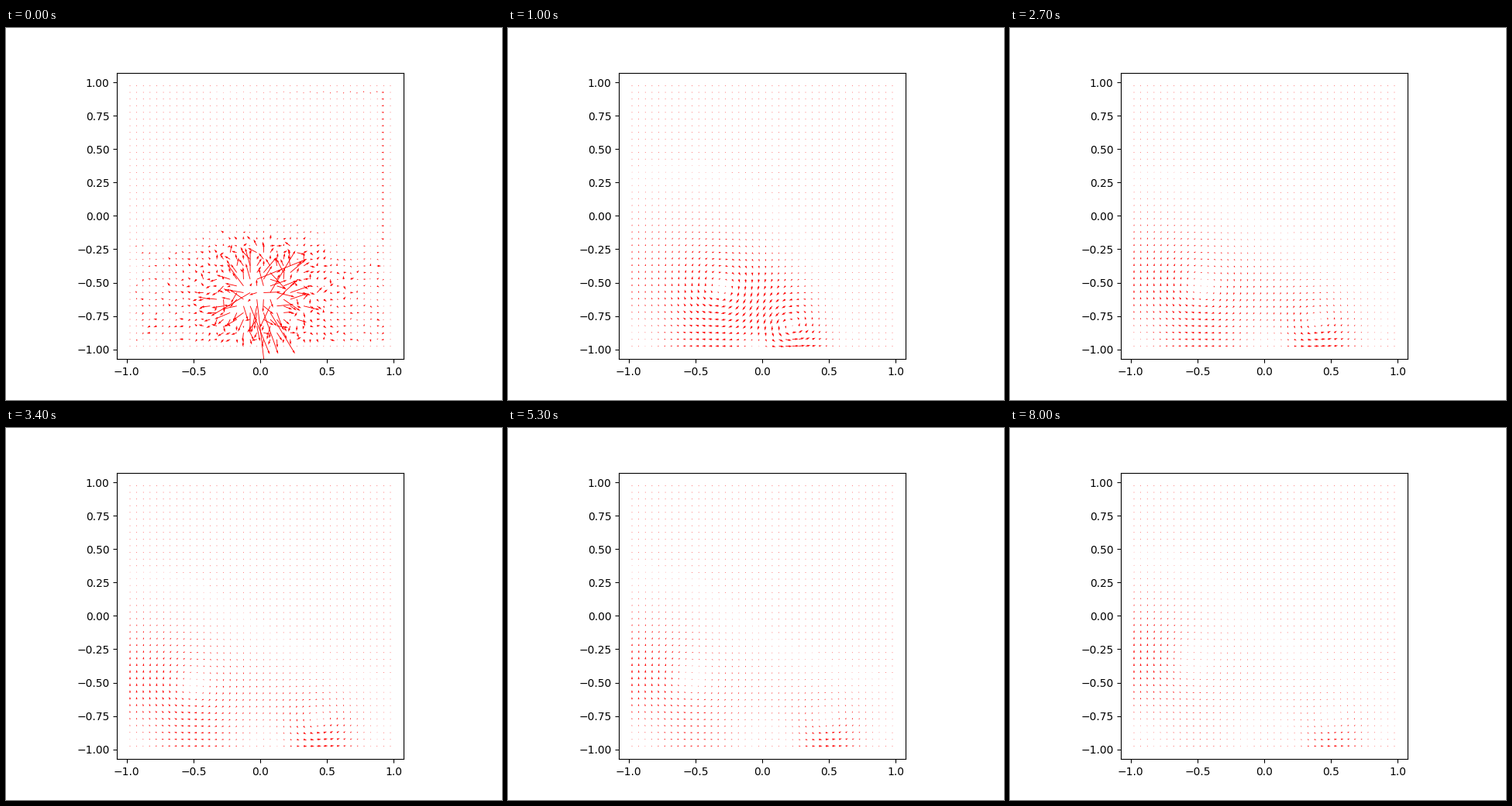
Animation, 640 px wide and 480 px high, one loop 8050 ms. Source, as a matplotlib script:

```python
import numpy as np
import matplotlib.pyplot as plt
from matplotlib.animation import FuncAnimation

N = 40
FRAMES = 161
STEP = 50  # ms

axis = (np.arange(N) + 0.5) * 2 / N - 1
X, Y = np.meshgrid(axis, axis)


def make_burst():
    """Initial burst: ragged outward kicks, plus ripples along the walls."""
    rng = np.random.default_rng(4)
    dx, dy = X, Y + .57
    r2 = dx ** 2 + dy ** 2
    fade = np.exp(-np.clip(Y + .3, 0, None) / .3)
    low = 1 / (1 + np.exp((Y + .2) / .1))
    spread = rng.lognormal(-.1, .3 + .5 * np.exp(-r2 / .06))
    length = np.minimum((1.1 / (r2 + .035) + low) * fade * spread, 115)
    angle = np.arctan2(dy, dx) + rng.normal(0, .75, (N, N))
    u, v = length * np.cos(angle), length * np.sin(angle)

    gap = 1 - np.maximum(np.abs(X), np.abs(Y))
    ripple = 3.5 * np.exp(-(gap - .07) / .06) * (.55 + .45 * X)
    ripple *= np.where(np.arange(N) % 2, 1, -1)
    side = np.abs(X) >= np.abs(Y)
    u += ripple * side
    v += ripple * ~side * .7
    inside = gap > .05
    return u * inside, v * inside


BURST = make_burst()
MODES = np.arange(N)
BASIS = np.cos(np.pi * np.outer(np.arange(N) + .5, MODES) / N)
BASIS *= np.where(MODES == 0, np.sqrt(1 / N), np.sqrt(2 / N))


def diffuse(field, t):
    heat = BASIS * np.exp(-(np.pi * MODES / N) ** 2 * 4 * t) @ BASIS.T
    return heat @ field @ heat.T * np.exp(-t / .2)


def mirrored(c):
    """A coordinate and its reflections in the two walls, with signs."""
    return (c, 1), (-2 - c, -1), (2 - c, -1)


def vortex(x, y, strength, core):
    """Clockwise vortex in the box; mirror images keep the walls closed."""
    u, v = np.zeros((2, N, N))
    for mx, sx in mirrored(x):
        for my, sy in mirrored(y):
            dx, dy = X - mx, Y - my
            spin = sx * sy * strength / (dx ** 2 + dy ** 2 + core ** 2)
            u += spin * dy
            v -= spin * dx
    return u, v


def velocity(n):
    t = n * STEP / 1000
    age = max(t, .3)
    drift = 1 - np.exp((1 - t) / 1.7)
    start = min(t / .4, 1)
    left = vortex(-.29 - .29 * drift, -.56 + .0045 * (t - 1) ** 2,
                  1.8 * age ** -.16, .18 * age ** .22)
    right = vortex(.2 + .3 * drift, -.83 + .03 * drift,
                   -1.5 * age ** -.3, .12 * age ** .17)
    return [start * (a + b) + diffuse(c, t)
            for a, b, c in zip(left, right, BURST)]


fig, ax = plt.subplots(figsize=(6.4, 4.8), dpi=100)
ax.set_aspect("equal")
ax.set_xlim(-1.0725, 1.0725)
ax.set_ylim(-1.0725, 1.0725)
ax.set_xticks(np.linspace(-1, 1, 5))
ax.set_yticks(np.linspace(-1, 1, 9))
arrows = ax.quiver(X, Y, *velocity(0), color="red",
                   scale_units="dots", scale=1)


def update(n):
    arrows.set_UVC(*velocity(n))
    return (arrows,)


anim = FuncAnimation(fig, update, frames=FRAMES, interval=STEP,
                     repeat=True, repeat_delay=0, blit=False)
plt.show()
```
